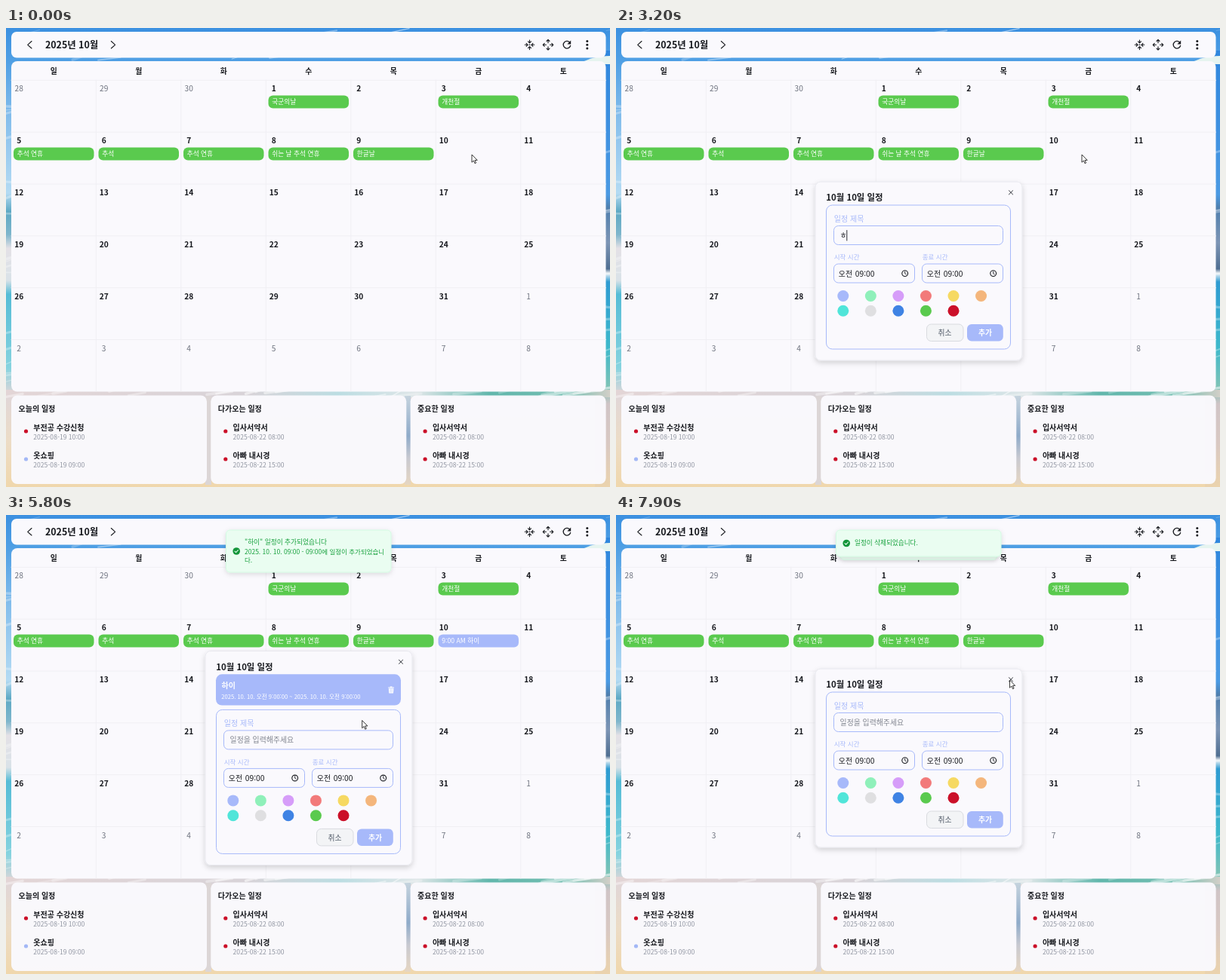
Write an HTML page that moves like this. It is 800 px wide and 609 px high and loops after 8000 ms.

```html
<!DOCTYPE html>
<html lang="ko">
<head>
<meta charset="utf-8">
<title>Calendar</title>
<style>
html, body { margin: 0; width: 100%; height: 100%; overflow: hidden; background: #3d92e2; }
svg { display: block; width: 100vw; height: 100vh; }
text { font-family: "Noto Sans CJK KR", "Noto Sans KR", "Noto Sans CJK", "Noto Sans", sans-serif; white-space: pre; }
</style>
</head>
<body>
<script>
const LOOP = 8000;
const INK = '#16181d', PALE = '#faf9fd', LILAC = '#a7b9fa', GREEN = '#5aca4e', RED = '#cb1029';
const NS = 'http://www.w3.org/2000/svg';

function el(parent, tag, attrs = {}) {
  const node = document.createElementNS(NS, tag);
  for (const key in attrs) node.setAttribute(key, attrs[key]);
  return parent.appendChild(node);
}
const group = (p, attrs) => el(p, 'g', attrs);
const box = (p, x, y, width, height, rx, fill, stroke = 'none') =>
  el(p, 'rect', { x, y, width, height, rx, fill, stroke });
const dot = (p, cx, cy, r, fill) => el(p, 'circle', { cx, cy, r, fill });
const line = (p, d, stroke = INK, width = 1.1) =>
  el(p, 'path', { d, stroke, 'stroke-width': width, fill: 'none', 'stroke-linecap': 'round', 'stroke-linejoin': 'round' });

// cy is the visual middle of the line of text
function label(p, str, x, cy, size, fill = INK, weight = 400, anchor = 'start') {
  const node = el(p, 'text', { x, y: cy + size * 0.37, 'font-size': size, fill, 'font-weight': weight, 'text-anchor': anchor });
  node.textContent = str;
  return node;
}

const svg = el(document.body, 'svg', { viewBox: '0 0 800 609', preserveAspectRatio: 'none' });
const defs = el(svg, 'defs');

function gradient(id, vertical, stops) {
  const g = el(defs, 'linearGradient', vertical ? { id, x1: 0, y1: 0, x2: 0, y2: 1 } : { id });
  for (const [offset, color] of stops) el(g, 'stop', { offset, 'stop-color': color });
  return `url(#${id})`;
}
function shadow(id, dy, blur, opacity) {
  const f = el(defs, 'filter', { id, x: '-20%', y: '-30%', width: '140%', height: '180%' });
  el(f, 'feDropShadow', { dx: 0, dy, stdDeviation: blur, 'flood-color': '#000', 'flood-opacity': opacity });
  return `url(#${id})`;
}
const softShadow = shadow('soft', 3, 3.5, 0.16);
const toastShadow = shadow('toast', 2, 3, 0.13);

let seed = 7;
const rand = () => (seed = (seed * 16807) % 2147483647) / 2147483647;

function drawScenery() {
  const g = group(svg);
  box(g, 0, 0, 800, 609, 0, gradient('sky', true, [
    [0, '#3b90e0'], [0.07, '#4f9fe4'], [0.2, '#86bfec'], [0.36, '#b4dbf3'], [0.4, '#5ea9c4'], [0.45, '#7fb6cc'],
    [0.48, '#e4e1e6'], [0.55, '#d9e2e8'], [0.58, '#55bcd6'], [0.74, '#86d3df'], [0.8, '#e0d6d8'], [0.9, '#ecdcc6'], [1, '#f0d7ac']]));
  box(g, 780, 30, 20, 579, 0, gradient('coast', true, [
    [0, '#2f86dd'], [0.33, '#4b9ae3'], [0.36, '#4f7fae'], [0.44, '#7d95b5'], [0.5, '#506f92'], [0.51, '#eef2f5'], [0.53, '#2f9bd2'],
    [0.68, '#3eb9cb'], [0.77, '#7ec3b6'], [0.81, '#d0c4c6'], [0.9, '#d9c8c2'], [1, '#ebd3ad']]));
  box(g, 0, 480, 800, 10, 0, gradient('shore', false, [
    [0, '#e3d5d6'], [0.4, '#d8d3d8'], [0.55, '#bcdde2'], [0.68, '#dfe6e8'], [0.8, '#62b7ac'], [0.93, '#72bdb0'], [1, '#d2cfc8']]));
  box(g, 264, 488, 8, 118, 0, '#dcd6d6');
  box(g, 528, 488, 8, 118, 0, gradient('gap', true, [[0, '#c5d3de'], [0.45, '#8fabc9'], [0.7, '#c8c9d0'], [1, '#e6d6c2']]));
  for (let i = 0; i < 46; i++) {
    const x = rand() * 800, y = i % 2 ? rand() * 46 : 482 + rand() * 8, len = 12 + rand() * 35;
    const streak = line(g, `M${x} ${y}l${len} ${-3 - rand() * 5}`, '#fff', 1 + rand() * 3);
    streak.setAttribute('opacity', 0.2 + rand() * 0.35);
  }
  for (let i = 0; i < 26; i++) {
    const y = 60 + rand() * 420, x = i % 3 ? -2 : 793;
    line(g, `M${x} ${y}l9 ${-4 + rand() * 5}`, '#fff', 1 + rand() * 3).setAttribute('opacity', 0.3);
  }
  el(g, 'path', { d: 'M765 45Q775 38 800 37V48H765Z', fill: '#e6f4f0' });
}

function drawHeader() {
  const g = group(svg);
  box(g, 7, 5, 787.5, 34.5, 7, PALE);
  line(g, 'M34 17.5L28.7 22.3L34 27');
  line(g, 'M139.3 17.5L144.6 22.3L139.3 27');
  label(g, '2025년 10월', 52, 22.5, 12.4, INK, 700);

  for (let a = 0; a < 360; a += 90) {
    const turn = (x) => group(g, { transform: `translate(${x} 22.3) rotate(${a})` });
    const pinch = turn(693.5);
    line(pinch, 'M0 -6.3V-2.8M-2 -4.4L0 -2.4L2 -4.4');
    if (a % 180) line(pinch, 'M0 0V-.6');
    const spread = turn(718);
    line(spread, 'M0 -2.5V-6.6M-2 -4.8L0 -6.8L2 -4.8');
  }
  line(g, 'M747 19.6A4.8 4.8 0 1 0 747.6 23.5', INK, 1.3);
  el(g, 'path', { d: 'M748.2 16.6V21.4H743.4Z', fill: INK });
  for (const y of [17.5, 22.3, 27.1]) dot(g, 769.8, y, 1.5, INK);
}

const COL = 112.5, ROW = 69;
function calendarEvent(p, col, row, str, fill) {
  const g = group(p);
  box(g, 10 + COL * col, 89.5 + ROW * row, 106.5, 17, 6, fill);
  label(g, str, 14.7 + COL * col, 98.2 + ROW * row, 8.7, '#fff');
  return g;
}

function drawCalendar() {
  const g = group(svg);
  box(g, 7, 44, 787.5, 438.5, 8, PALE);
  for (let i = 0; i < 6; i++) {
    line(g, `M7 ${69.3 + i * 68.85}H794.5`, '#f0eff4', 1);
    line(g, `M${119.3 + i * COL} 69V482`, '#f0eff4', 1);
  }
  [...'일월화수목금토'].forEach((day, i) => label(g, day, 63.2 + COL * i, 57, 9.8, INK, 700, 'middle'));
  for (let i = 0; i < 42; i++) {
    const n = i - 2;
    const inMonth = n > 0 && n < 32;
    const shown = n < 1 ? n + 30 : n > 31 ? n - 31 : n;
    label(g, shown, 17.2 + COL * (i % 7), 80.2 + ROW * Math.floor(i / 7), 10.2, inMonth ? INK : '#6d727e', inMonth ? 700 : 500, 'middle');
  }
  calendarEvent(g, 3, 0, '국군의날', GREEN);
  calendarEvent(g, 5, 0, '개천절', GREEN);
  ['추석 연휴', '추석', '추석 연휴', '쉬는 날 추석 연휴', '한글날']
    .forEach((name, col) => calendarEvent(g, col, 1, name, GREEN));
}

function drawAgenda() {
  const shared = [['입사서약서', '2025-08-22 08:00', RED], ['아빠 내시경', '2025-08-22 15:00', RED]];
  const lists = [
    ['오늘의 일정', [['부전공 수강신청', '2025-08-19 10:00', RED], ['옷쇼핑', '2025-08-19 09:00', '#a3b8f6']]],
    ['다가오는 일정', shared],
    ['중요한 일정', shared]];
  lists.forEach(([title, items], i) => {
    const g = group(svg, { transform: `translate(${i * 264.3} 0)` });
    box(g, 7, 487.5, 259, 117.5, 8, PALE).setAttribute('opacity', 0.97);
    label(g, title, 16.5, 505, 10, INK, 700);
    items.forEach(([name, date, color], k) => {
      const y = 37 * k;
      dot(g, 26.5, 535 + y, 2.6, color);
      label(g, name, 36.3, 530 + y, 10, INK, 700);
      label(g, date, 36.3, 543.2 + y, 8.6, '#9196a2');
    });
  });
}

drawScenery();
drawHeader();
drawCalendar();
drawAgenda();
const newEvent = calendarEvent(svg, 5, 1, '9:00 AM 하이', LILAC);

// dialog
const modal = group(svg);
const panel = box(modal, 264, 204, 274, 237, 7, PALE, '#e8e8ee');
panel.setAttribute('filter', softShadow);
const modalHead = group(modal);
label(modalHead, '10월 10일 일정', 278.3, 21, 11.4, INK, 700);
line(modalHead, 'M520.4 11.7L525.6 16.9M525.6 11.7L520.4 16.9', '#33363d', 1);
const closeRing = box(modalHead, 516, 7.3, 14, 14, 2.5, 'none', '#555b70');

const addButton = group(modal);
box(addButton, 278.5, 313, 244.5, 36.5, 7, 'none', '#d9dbe6');
label(addButton, '+ 일정 추가', 401, 331.5, 10, '#4b5563', 700, 'middle');

const card = group(modal);
box(card, 278, 211.3, 245, 41.3, 8, LILAC);
label(card, '하이', 285.5, 226.3, 10, '#fff', 700);
label(card, '2025. 10. 10. 오전 9:00:00 ~ 2025. 10. 10. 오전 9:00:00', 285.3, 241, 7.6, '#fff');
el(card, 'path', { d: 'M506.2 228.4h2.2l.5-.9h2.4l.5.9h2.2v1.1h-7.8zM506.8 230.2h6.6l-.5 6.2h-5.6z', fill: '#fff' });
line(card, 'M509 231.5v3.6M511.2 231.5v3.6', LILAC, 0.6);

const form = group(modal);
box(form, 278.5, 235, 244, 191, 8, 'none', LILAC);
label(form, '일정 제목', 288.8, 253, 10, LILAC, 500);
box(form, 288.5, 262.5, 224, 25, 6, PALE, LILAC);
const titleText = label(form, '', 296.6, 275.3, 9.9);
const caret = line(form, 'M0 268.5V282', INK, 0.9);
[['시작 시간', 0], ['종료 시간', 117]].forEach(([name, dx]) => {
  const g = group(form, { transform: `translate(${dx} 0)` });
  label(g, name, 288.8, 304.2, 8.5, LILAC, 500);
  box(g, 288.5, 313, 107, 25, 6, PALE, LILAC);
  label(g, '오전', 294.8, 326, 9.9);
  label(g, '09:00', 316.8, 326, 10.3);
  el(g, 'circle', { cx: 382.7, cy: 325.6, r: 3.9, fill: 'none', stroke: INK, 'stroke-width': 1.1 });
  line(g, 'M382.7 323.3V325.8L384.3 326.8', INK, 0.9);
});
[LILAC, '#8ff0ba', '#d69df9', '#f27a7a', '#f6d962', '#f4b67c', '#50e5d9', '#dfdfe1', '#3f83e4', GREEN, RED]
  .forEach((color, i) => dot(form, 300.8 + 36.55 * (i % 6), i < 6 ? 355.5 : 375.3, 7.5, color));
box(form, 411.5, 393, 48.5, 22.5, 6, '#f3f4f6', '#d9dbe0');
label(form, '취소', 435.6, 404.5, 9.8, '#4b5563', 500, 'middle');
box(form, 465, 393, 47.8, 22.5, 6, LILAC);
label(form, '추가', 488.9, 404.5, 9.8, '#fff', 700, 'middle');

// notifications
function makeToast(height, lines) {
  const g = group(svg);
  const body = box(g, 291.5, 20, 218.5, height, 5, '#eafdf1', '#d3fbe2');
  body.setAttribute('filter', toastShadow);
  const content = group(g);
  const mid = 20 + height / 2;
  dot(content, 305.2, mid, 4.8, '#14953a');
  line(content, `M303 ${mid + 0.2}L304.6 ${mid + 1.7}L307.5 ${mid - 1.5}`, '#eafdf1', 1.1);
  for (const [str, y, size] of lines) label(content, str, 316, y, size, '#16a03c');
  return { g, body, content };
}
const added = makeToast(56, [
  ['"하이" 일정이 추가되었습니다', 36, 8.7],
  ['2025. 10. 10. 09:00 - 09:00에 일정이 추가되었습니', 49, 8.5],
  ['다.', 60.3, 8.5]]);
const removed = makeToast(35, [['일정이 삭제되었습니다.', 36.6, 8.6]]);

const pointer = el(svg, 'path', {
  d: 'M0 0V10.2L2.4 8L4 11.7L5.6 11L4 7.4H7.2Z', fill: '#fff', stroke: '#222', 'stroke-width': 0.9, 'stroke-linejoin': 'round' });

// timing
const OPEN = 1180, FORM = 2200, SAVED = 3950, DELETED = 7480;
const typed = [[3100, 'ㅎ'], [3300, '하'], [3500, '항'], [3600, '하이']];
const path = [[0, 617, 168], [5000, 617, 168], [5700, 471.7, 272.5], [6000, 471.7, 272.5],
  [6700, 508.3, 228], [7500, 508.3, 228], [7850, 521.5, 219]];

const clamp = (v) => Math.min(1, Math.max(0, v));
const mix = (a, b, k) => a + (b - a) * k;

// cubic-bezier(.25, .1, .25, 1)
function ease(t) {
  t = clamp(t);
  if (t === 0 || t === 1) return t;
  let lo = 0, hi = 1, s;
  for (let i = 0; i < 20; i++) {
    s = (lo + hi) / 2;
    const x = 0.75 * s * (1 - s) + s ** 3;
    if (x < t) lo = s; else hi = s;
  }
  return 0.3 * s * (1 - s) ** 2 + 3 * s * s * (1 - s) + s ** 3;
}
const show = (node, on) => node.setAttribute('display', on ? 'inline' : 'none');
const set = (node, attrs) => { for (const k in attrs) node.setAttribute(k, attrs[k]); };

function pointerAt(t) {
  let i = path.length - 1;
  while (path[i][0] > t) i--;
  const a = path[i], b = path[i + 1] || a;
  const k = b === a ? 0 : clamp((t - a[0]) / (b[0] - a[0]));
  const s = k * k * (3 - 2 * k);
  return [mix(a[1], b[1], s), mix(a[2], b[2], s)];
}

function drawModal(t) {
  const saved = t >= SAVED && t < DELETED, hasForm = t >= FORM;
  const k = ease((t - OPEN) / 200), scale = mix(0.95, 1, k);
  const top = !hasForm ? 281 : saved ? 180.5 : 204;
  show(modal, t >= OPEN);
  set(modal, { opacity: k, transform: `translate(401 322.5) scale(${scale}) translate(-401 -322.5)` });
  set(panel, { y: top, height: 2 * (322.5 - top) });
  set(modalHead, { transform: `translate(0 ${top})` });
  set(form, { transform: `translate(0 ${saved ? 23.4 : 0})` });
  show(closeRing, !hasForm);
  show(addButton, !hasForm);
  show(form, hasForm);
  show(card, saved);
  show(newEvent, saved);

  let text = '';
  if (t < SAVED) for (const [at, str] of typed) if (t >= at) text = str;
  titleText.textContent = text || '일정을 입력해주세요';
  titleText.setAttribute('fill', text ? INK : '#81858f');
  const since = t < 3100 ? t - FORM : t < 4100 ? 0 : t - 4100;
  show(caret, t < 7000 && since % 1000 < 500);
  caret.setAttribute('transform', `translate(${296.9 + text.length * 8.9} 0)`);
}

function drawToasts(t) {
  const a = ease((t - SAVED - 20) / 400), r = ease((t - DELETED) / 400);
  show(added.g, t >= SAVED);
  const back = mix(1, 0.95, r);
  set(added.g, {
    opacity: a,
    transform: `translate(400.75 ${20 - 56 * (1 - a) + 6 * r}) scale(${back}) translate(-400.75 -20)` });
  set(added.body, { height: mix(56, 35, r) });
  set(added.content, { opacity: 1 - r });
  show(removed.g, t >= DELETED);
  set(removed.g, { opacity: r, transform: `translate(0 ${-35 * (1 - r)})` });
}

function frame() {
  const t = Math.floor((performance.now() + 8) / 100) * 100 % LOOP;
  drawModal(t);
  drawToasts(t);
  pointer.setAttribute('transform', `translate(${pointerAt(t).join(' ')})`);
  requestAnimationFrame(frame);
}
frame();
</script>
</body>
</html>
```
